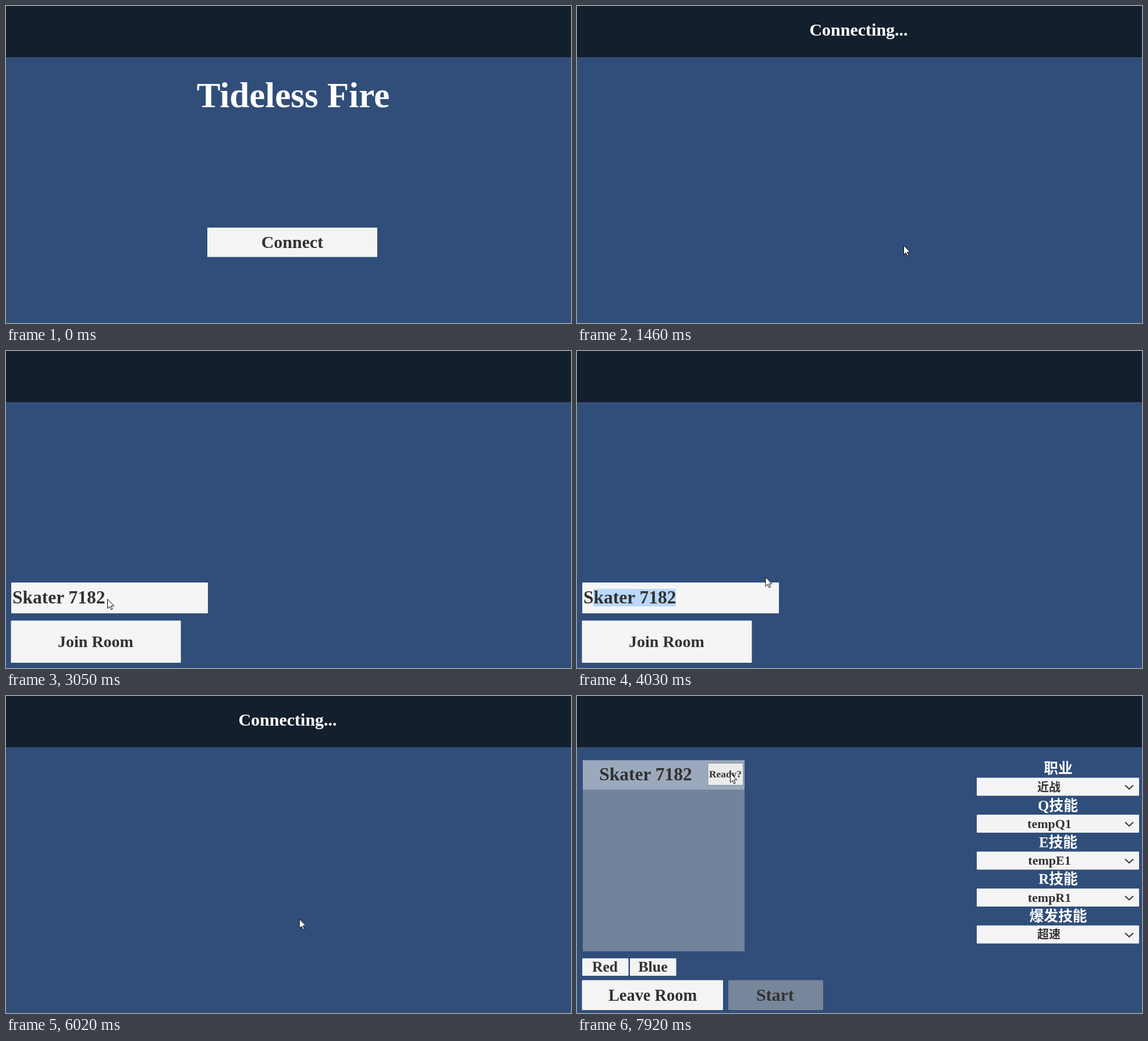
An HTML page that plays this animation: 971 by 545 pixels, repeating every 7990 ms.

```html
<!DOCTYPE html>
<html lang="zh-CN">
<head>
<meta charset="utf-8">
<title>Lobby</title>
<style>
  html, body { margin: 0; width: 100%; height: 100%; overflow: hidden; background: #304e79; }
  svg { display: block; width: 100vw; height: 100vh; }
  text {
    font: bold 30px "Liberation Serif", "Noto Sans CJK SC", "Noto Sans CJK", serif;
    fill: #323232; text-anchor: middle; white-space: pre;
  }
  .light text, .light { fill: #fff; }
  .left { text-anchor: start; }
  .name { font-size: 31.5px; }
  .label text { font-size: 24.8px; fill: #fff; }
  .value text { font-size: 22px; }
  .value .han { font-size: 20px; }
  .btn { fill: #f4f4f4; }

  /* every part shares one 7.99 s clock */
  .menu, .status, .lobby, .room, .connect, .field, .pick, .join, .start, .ready, .cursor {
    animation: 7.99s linear infinite;
  }
  .menu { animation-name: menu; animation-timing-function: step-end; }
  .status { animation-name: status; animation-timing-function: step-end; }
  .lobby { animation-name: lobby; animation-timing-function: step-end; }
  .room { animation-name: room; animation-timing-function: step-end; }
  .connect { animation-name: connect; }
  .field { animation-name: field; }
  .pick { animation-name: pick; animation-timing-function: step-end; transform-origin: 170px 0; fill: #bbd8fc; }
  .join { animation-name: join; animation-timing-function: step-end; }
  .start { animation-name: start; }
  .ready { animation-name: ready; animation-timing-function: step-end; }
  .cursor { animation-name: cursor; }

  @keyframes menu { 0% { opacity: 1 } 18.2%, 100% { opacity: 0 } }
  @keyframes status {
    0% { opacity: 0 } 18.2% { opacity: 1 } 28.1% { opacity: 0 }
    70.28% { opacity: 1 } 76.78%, 100% { opacity: 0 }
  }
  @keyframes lobby { 0% { opacity: 0 } 28.1% { opacity: 1 } 70.28%, 100% { opacity: 0 } }
  @keyframes room { 0% { opacity: 0 } 76.78%, 100% { opacity: 1 } }

  @keyframes connect { 0%, 16.4% { fill: #f4f4f4 } 17.7%, 100% { fill: #c8c8c8 } }
  @keyframes field {
    0%, 34.5% { fill: #fff } 35.7%, 40.4% { fill: #f5f5f5 }
    41.4%, 44.4% { fill: #dcdcdc } 45.6%, 65.9% { fill: #f5f5f5 }
    66%, 100% { fill: #fff }
  }
  @keyframes pick {
    0% { transform: scaleX(0) }
    40.5% { transform: scaleX(.094) }
    41.4% { transform: scaleX(.29) }
    42.3% { transform: scaleX(.44) }
    43% { transform: scaleX(.61) }
    43.8% { transform: scaleX(.775) }
    44.5% { transform: scaleX(.8875) }
    52.1% { transform: scaleX(1) }
    66%, 100% { transform: scaleX(0) }
  }
  @keyframes join { 0% { fill: #f5f5f5 } 66%, 100% { fill: #ebebeb } }
  @keyframes start {
    0%, 76.78% { fill: #f4f4f4 } 77.7% { fill: #9ba6b4 } 78.3%, 100% { fill: #78869b }
  }
  @keyframes ready { 0% { fill: #f4f4f4 } 89%, 100% { fill: #ebebeb } }

  @keyframes cursor {
    0% { transform: translate(-40px, 39px); animation-timing-function: step-end }
    2.5% { transform: translate(706px, 39px); animation-timing-function: ease-in-out }
    12.39% { transform: translate(562px, 411px) }
    14.1%, 19.8% { transform: translate(561px, 411px); animation-timing-function: ease-in-out }
    24.7%, 29.7% { transform: translate(745px, 443px); animation-timing-function: ease-in }
    33.6% { transform: translate(480px, 411px); animation-timing-function: ease-out }
    38.1%, 39.7% { transform: translate(174px, 426px) }
    44.2% { transform: translate(30px, 418px) }
    45.1% { transform: translate(36px, 391px) }
    50.4% { transform: translate(321px, 389px) }
    52.2% { transform: translate(408px, 354px) }
    53.8%, 55.4% { transform: translate(415px, 366px); animation-timing-function: ease-in-out }
    65.2%, 69.5% { transform: translate(243px, 499px); animation-timing-function: ease-in-out }
    77.7%, 81% { transform: translate(557px, 359px); animation-timing-function: ease-in-out }
    90.1% { transform: translate(250px, 123px) }
    91.7% { transform: translate(257px, 124px) }
    92.6%, 95.1% { transform: translate(263px, 127px) }
    99.1%, 100% { transform: translate(263px, 132px) }
  }
</style>
</head>
<body>
<svg viewBox="0 0 971 545" preserveAspectRatio="none">
  <defs>
    <g id="drop">
      <rect class="btn" x="687" y="140.5" width="279" height="31" rx="1"/>
      <path d="M942 153.5l7 6.5l7-6.5" fill="none" stroke="#323232" stroke-width="2"/>
    </g>
  </defs>

  <rect width="971" height="545" fill="#304e79"/>
  <rect width="971" height="88" fill="#141f2d"/>

  <g class="menu">
    <text class="light" x="493.5" y="174" style="font-size:61px">Tideless Fire</text>
    <rect class="connect" x="346" y="381" width="292" height="50.5"/>
    <text x="492" y="415.5">Connect</text>
  </g>

  <g class="status light"><text x="484" y="50.5">Connecting...</text></g>

  <g class="lobby">
    <rect class="field" x="9" y="398" width="338" height="53" rx="1"/>
    <rect class="pick" x="10" y="409" width="160" height="30"/>
    <text class="left name" x="11" y="434">Skater 7182</text>
    <rect class="join" x="8.5" y="463.5" width="292" height="72.5" rx="1"/>
    <text x="154" y="509" style="font-size:28px">Join Room</text>
  </g>

  <g class="room">
    <rect x="10" y="110.5" width="278" height="328.5" fill="#72839c"/>
    <rect x="10" y="110.5" width="278" height="50.5" fill="#9ba9bc"/>
    <text class="name" x="118" y="145">Skater 7182</text>
    <rect class="ready" x="225" y="115.5" width="60.5" height="38" stroke="#838c98"/>
    <text x="255" y="140" style="font-size:17.4px">Ready?</text>

    <g class="btn">
      <rect x="9" y="451" width="79.5" height="30" rx="1"/>
      <rect x="91" y="451" width="79.5" height="30" rx="1"/>
      <rect x="8.5" y="488.5" width="242.5" height="51.5" rx="1"/>
    </g>
    <rect class="start" x="260" y="488.5" width="163" height="51.5" rx="1"/>
    <text x="48" y="474" style="font-size:25.6px">Red</text>
    <text x="130.5" y="474" style="font-size:26px">Blue</text>
    <text x="130" y="523.5" style="font-size:28.4px">Leave Room</text>
    <text x="340.5" y="523.5">Start</text>

    <use href="#drop"/>
    <use href="#drop" y="63.5"/>
    <use href="#drop" y="127"/>
    <use href="#drop" y="190.5"/>
    <use href="#drop" y="254"/>
    <g class="label">
      <text x="827" y="133">职业</text>
      <text x="826.5" y="196.5">Q技能</text>
      <text x="827" y="260">E技能</text>
      <text x="827" y="323">R技能</text>
      <text x="827" y="386.5">爆发技能</text>
    </g>
    <g class="value">
      <text class="han" x="811" y="163.5">近战</text>
      <text x="812" y="226.5">tempQ1</text>
      <text x="812" y="290">tempE1</text>
      <text x="812" y="353.5">tempR1</text>
      <text class="han" x="811" y="417">超速</text>
    </g>
  </g>

  <path class="cursor" d="M.5 .7V16.6L4.2 13.2L6.7 18.7L9 17.7L6.6 12.2H11.6Z"
        fill="#fff" stroke="#000"/>
</svg>
</body>
</html>
```
